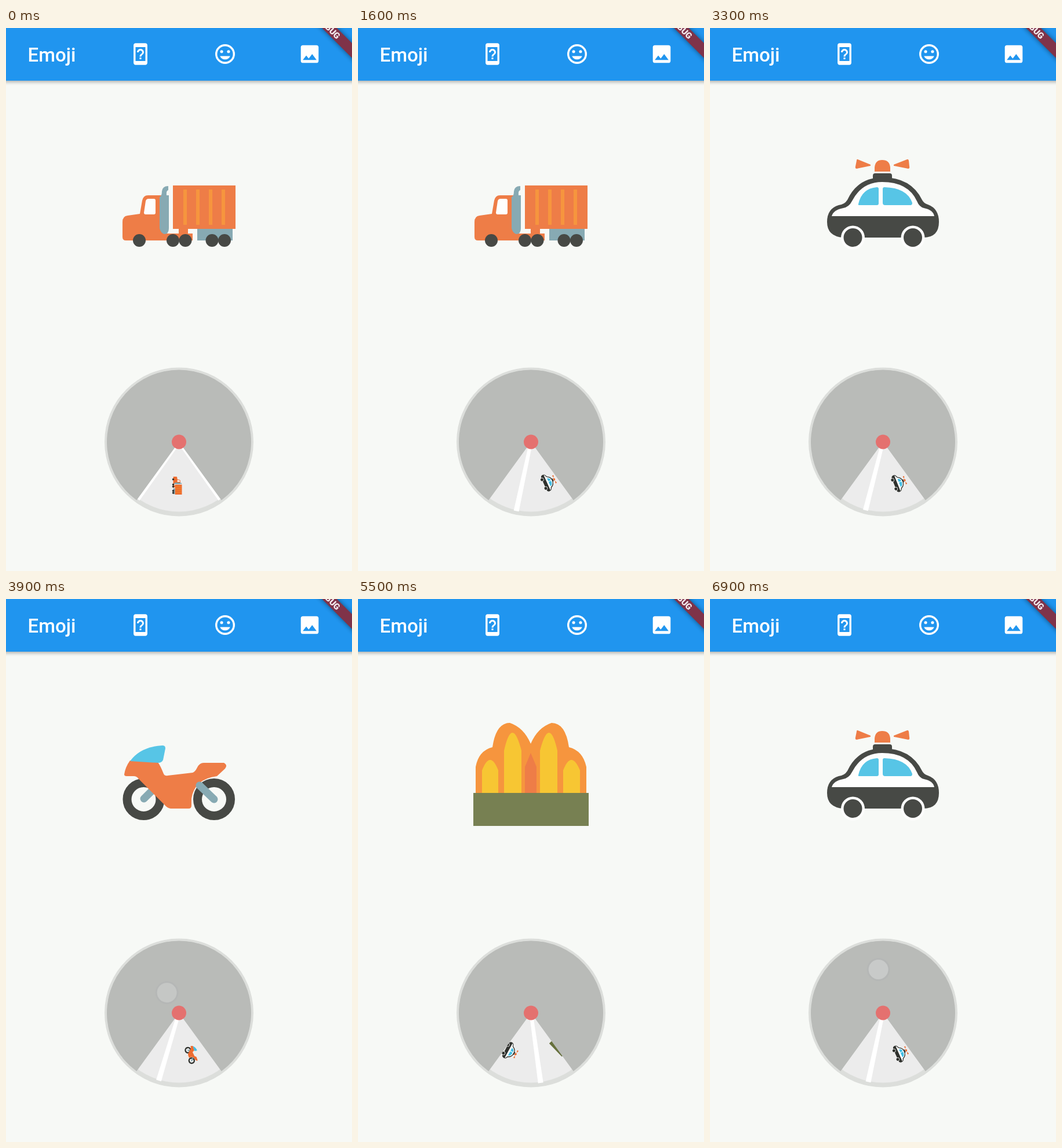
An HTML page for the animation above (7000 ms loop, 597x938 px).

```html
<!DOCTYPE html>
<html lang="en">
<head>
<meta charset="utf-8">
<title>Emoji wheel</title>
<style>
  html, body { margin: 0; width: 100%; height: 100%; overflow: hidden; background: #f7f9f6; }
  svg { display: block; width: 100%; height: 100%; overflow: hidden; }
  text { font-family: Roboto, sans-serif; }
  .bar { fill: #2095ef; filter: drop-shadow(0 2px 3px rgba(0, 0, 0, .33)); }
  .banner { fill: #7f3349; filter: drop-shadow(0 0 4.5px rgba(0, 0, 0, .5)); }
  .orange { fill: #ed6c30; } .amber { fill: #f68825; } .yellow { fill: #f8c019; }
  .dark { fill: #2f312d; } .teal { fill: #78a0aa; } .cyan { fill: #41bee4; }
  .pink { fill: #cd5984; } .olive { fill: #66703c; } .white { fill: #fff; }
</style>
</head>
<body>
<svg viewBox="0 0 597 938">
  <defs>
    <g id="police">
      <path class="orange" d="M284 248V241Q285 228 297 228Q310 228 311 241V248Z
        M255 227L277 236V238L253 243Q250 243 251 239L253 229Q253 226 255 227Z
        M340 227L317 236V238L342 243Q345 243 344 239L343 229Q342 226 340 227Z"/>
      <rect class="dark" x="281" y="251" width="33" height="16" rx="4"/>
      <path class="dark" d="M202 335Q202 312 222 306Q232 305 237 297Q255 258 298 258Q347 258 366 297
        Q368 302 376 305Q395 312 395 335Q395 362 368 362H230Q202 360 202 335Z"/>
      <path class="white" d="M210 325Q213 314 230 311Q240 309 245 299Q262 266 297 266Q342 266 357 299
        Q361 309 369 311Q385 314 387 325Z"/>
      <path class="cyan" d="M256 304Q262 277 288 275Q291 275 291 278V303Q291 306 288 306H258Q255 306 256 304Z
        M298 278Q298 275 301 275Q340 276 349 302Q349 306 346 306H302Q298 306 298 302Z"/>
      <g class="white"><circle cx="246.5" cy="362" r="20.5"/><circle cx="350" cy="362" r="20.5"/></g>
      <g class="dark"><circle cx="246.5" cy="362" r="16"/><circle cx="350" cy="362" r="16"/></g>
    </g>
    <g id="truck">
      <path class="teal" d="M330 347H391V367H330Z"/>
      <path class="orange" d="M288 272H396V347H288Z
        M201 361V335Q201 325 210 324L231 321L235 298Q237 289 245 289H273V355H298V347H314V355H322V367H207Q201 367 201 361Z"/>
      <path d="M309 279V340M331 279V340M353 279V340M375 279V340" stroke="#f68825" stroke-width="6"/>
      <path class="white" d="M246 295H255Q258 295 258 298V319Q258 322 255 322H241Q238 322 238 319L241 299Q242 295 246 295Z"/>
      <path class="teal" d="M265 292Q269 290 269 282Q270 273 280 273V280Q276 281 277 289H281V346Q281 356 273 356Q267 354 265 346Z"/>
      <g class="dark"><circle cx="230" cy="367" r="11"/><circle cx="288" cy="367" r="11"/><circle cx="309.5" cy="367" r="11"/>
        <circle cx="355.5" cy="367" r="11"/><circle cx="377" cy="367" r="11"/></g>
    </g>
    <g id="bike">
      <g fill="none" stroke="#2f312d" stroke-width="15">
        <circle cx="237.5" cy="346" r="28.5"/><circle cx="359" cy="346" r="28.5"/></g>
      <path d="M238 345L256 327" stroke="#78a0aa" stroke-width="13" stroke-linecap="round"/>
      <path class="orange" d="M204 303Q206 290 214 279L262 282Q266 287 272 302Q274 306 279 305L322 300Q326 299 330 291
        Q334 283 341 283H376Q383 287 378 293L364 306Q325 311 320 345V357Q320 362 315 362H284Q278 361 274 356
        L229 311Q226 306 220 306H208Q204 306 204 303Z"/>
      <path d="M334 322L359 346" stroke="#78a0aa" stroke-width="13" stroke-linecap="round"/>
      <path class="cyan" d="M214 280Q232 255 270 253Q275 253 275 258L271 278Q269 283 262 283Z"/>
    </g>
    <g id="popper">
      <path class="yellow" d="M207 381L236 299Q246 268 261 265Q268 266 262 274Q250 287 258 306Q272 331 294 336
        Q311 337 318 325Q325 321 325 328Q322 343 300 350L215 387Q205 389 207 381Z
        M287 266L297 270L295 277L286 274Z M309 286L313 283L322 299L316 303L308 292Z"/>
      <path class="orange" d="M268 195Q276 194 283 202Q271 220 281 230Q290 246 282 260Q276 274 283 282Q280 296 268 296
        Q272 286 269 278Q264 268 270 254Q274 242 264 230Q255 216 268 195Z"/>
      <path class="orange" d="M363 203Q372 199 376 202L379 215Q372 222 358 224Q352 236 345 242Q332 248 327 258
        Q318 262 311 268Q302 284 296 299Q292 297 296 287Q298 264 311 249Q325 243 331 235Q333 226 347 221Q352 212 363 203Z"/>
      <path class="orange" d="M296 323Q304 307 325 306Q340 305 349 313Q364 308 374 316Q384 321 395 321L389 341
        Q376 341 365 330Q350 329 342 326Q325 318 312 322Q300 324 296 325Z"/>
    </g>
    <g id="mounds">
      <path class="amber" d="M203 340V290Q208 262 232 256Q238 214 262 214Q286 222 298 250Q310 222 334 214Q358 214 364 256Q388 262 394 290V340Z"/>
      <path class="yellow" d="M214 335V296Q228 260 242 296V335Z M252 335V262Q266 200 282 262V335Z
        M314 335V262Q330 200 344 262V335Z M354 335V296Q368 260 383 296V335Z"/>
      <path class="orange" d="M288 335V290L298 266L308 290V335Z"/>
      <path class="olive" d="M199 335H398V392H199Z"/>
    </g>
  </defs>

  <rect class="bar" x="-20" y="-20" width="637" height="111"/>
  <text x="37.5" y="58" font-weight="500" font-size="33" fill="#fff">Emoji</text>
  <g fill="#fff" fill-rule="evenodd">
    <path transform="translate(211.6 24.6) scale(1.7)" d="M17 1H7c-1.1 0-2 .9-2 2v18c0 1.1.9 2 2 2h10c1.1 0 2-.9 2-2V3c0-1.1-.9-2-2-2z
      m0 18H7V5h10v14zM12 6.72c-1.96 0-3.5 1.52-3.5 3.47h1.75c0-.93.82-1.75 1.75-1.75s1.75.82 1.75 1.75
      c0 1.75-2.63 1.57-2.63 4.45h1.76c0-1.96 2.62-2.19 2.62-4.45 0-1.96-1.54-3.47-3.5-3.47z
      m-.88 8.8h1.76v1.76h-1.76z"/>
    <g transform="translate(357.6 24.6) scale(1.7)">
      <circle cx="12" cy="12" r="9" fill="none" stroke="#fff" stroke-width="2"/>
      <circle cx="15.5" cy="9.5" r="1.5"/><circle cx="8.5" cy="9.5" r="1.5"/>
      <path d="M12 17.5c2.33 0 4.31-1.46 5.11-3.5H6.89c.8 2.04 2.78 3.5 5.11 3.5z"/>
    </g>
    <path transform="translate(503.6 24.6) scale(1.7)" d="M21 19V5c0-1.1-.9-2-2-2H5c-1.1 0-2 .9-2 2v14c0 1.1.9 2 2 2h14
      c1.1 0 2-.9 2-2zM8.5 13.5l2.5 3.01L14.5 12l4.5 6H5l3.5-4.5z"/>
  </g>
  <g transform="translate(557.5 -.5) rotate(45)">
    <rect class="banner" x="-90" y="-9" width="180" height="18"/>
    <text y="5.3" text-anchor="middle" font-weight="900" font-size="14.8" fill="#f4ecef">DEBUG</text>
  </g>

  <use id="shown" opacity=".88"/>

  <g transform="translate(298.5 715)">
    <circle r="128.5" fill="#dcdedb"/>
    <circle r="120.5" fill="#ececec"/>
    <g id="wheel"></g>
    <path d="M0 0L73.2 100.7A124.5 124.5 0 1 0 -73.2 100.7Z" fill="#b9bbb8"/>
    <g id="touch">
      <circle r="20" fill="#b5b7b6"/>
      <circle r="17" fill="#c8cac9"/>
    </g>
    <circle r="12.5" fill="#e4716f"/>
  </g>
</svg>

<script>
  const $ = id => document.getElementById(id);
  const emojis = ['police', 'truck', 'bike', 'popper', 'mounds'];
  const slice = 72, loop = 7000, step = 100;

  // Confetti: class, x, y, width, height, tilt
  const confetti = [
    ['cyan', 230, 203, 15, 14, 42], ['cyan', 310, 215, 17, 18, 22], ['pink', 231, 240, 15, 18, -36],
    ['cyan', 209, 274, 13, 12, 18], ['pink', 381, 246, 19, 15, -8], ['cyan', 360, 283, 18, 14, 3],
    ['pink', 335, 360, 15, 18, -32], ['cyan', 369, 374, 14, 13, 42]
  ];
  $('popper').innerHTML += confetti.map(([c, x, y, w, h, tilt]) =>
    `<rect class="${c}" x="${-w / 2}" y="${-h / 2}" width="${w}" height="${h}" rx="2"
      transform="translate(${x} ${y}) rotate(${tilt})"/>`).join('');

  $('wheel').innerHTML = emojis.map((name, i) =>
    `<path class="white" d="M-3 6H3L4.5 122H-4.5Z" transform="rotate(${(i + .5) * slice})"/>
     <use href="#${name}" transform="rotate(${i * slice}) translate(2 75.5) rotate(90) scale(.158) translate(-298.5 -291)"/>`
  ).join('');

  // Drags and flings: start, end, angle from, angle to, power, finger (x, y, wheel angle there, opacity)
  const moves = [
    [0, 850, 72, 72, 1],
    [850, 2200, 72, 0, 1.355],
    [2200, 2500, 0, 57.6, .6, [-8, -75, 24, 1]],
    [2500, 3800, 57.6, 504, 1.355],
    [3800, 3901, 504, 523.5, 1, [-21, -35, 523.5, .8]],
    [3901, 6000, 523.5, 720, 1.355],
    [6000, 6550, 720, 720, 1],
    [6550, 6901, 0, 24, 1, [-8, -75, 24, 1]]
  ];

  function draw(t) {
    const move = moves.find(m => t < m[1]) || moves[moves.length - 1];
    const [start, end, from, to, power, finger] = move;
    const left = Math.max(0, 1 - (t - start) / (end - start));
    const angle = to - (to - from) * left ** power;

    // The last emoji to pass the bottom is the one shown large
    const turn = angle / slice;
    const index = to < from ? Math.ceil(turn - 1e-6) : Math.floor(turn + 1e-6);
    $('shown').setAttribute('href', '#' + emojis[index % emojis.length]);
    $('wheel').setAttribute('transform', `rotate(${-angle})`);

    $('touch').setAttribute('opacity', finger ? finger[3] : 0);
    if (finger) {
      const [x, y, at] = finger;
      $('touch').setAttribute('transform', `rotate(${at - angle}) translate(${x} ${y})`);
    }
  }

  const origin = performance.now();
  function tick() {
    const t = (performance.now() - origin) % loop;
    draw(Math.floor(t / step) * step);
    requestAnimationFrame(tick);
  }
  tick();
</script>
</body>
</html>
```
